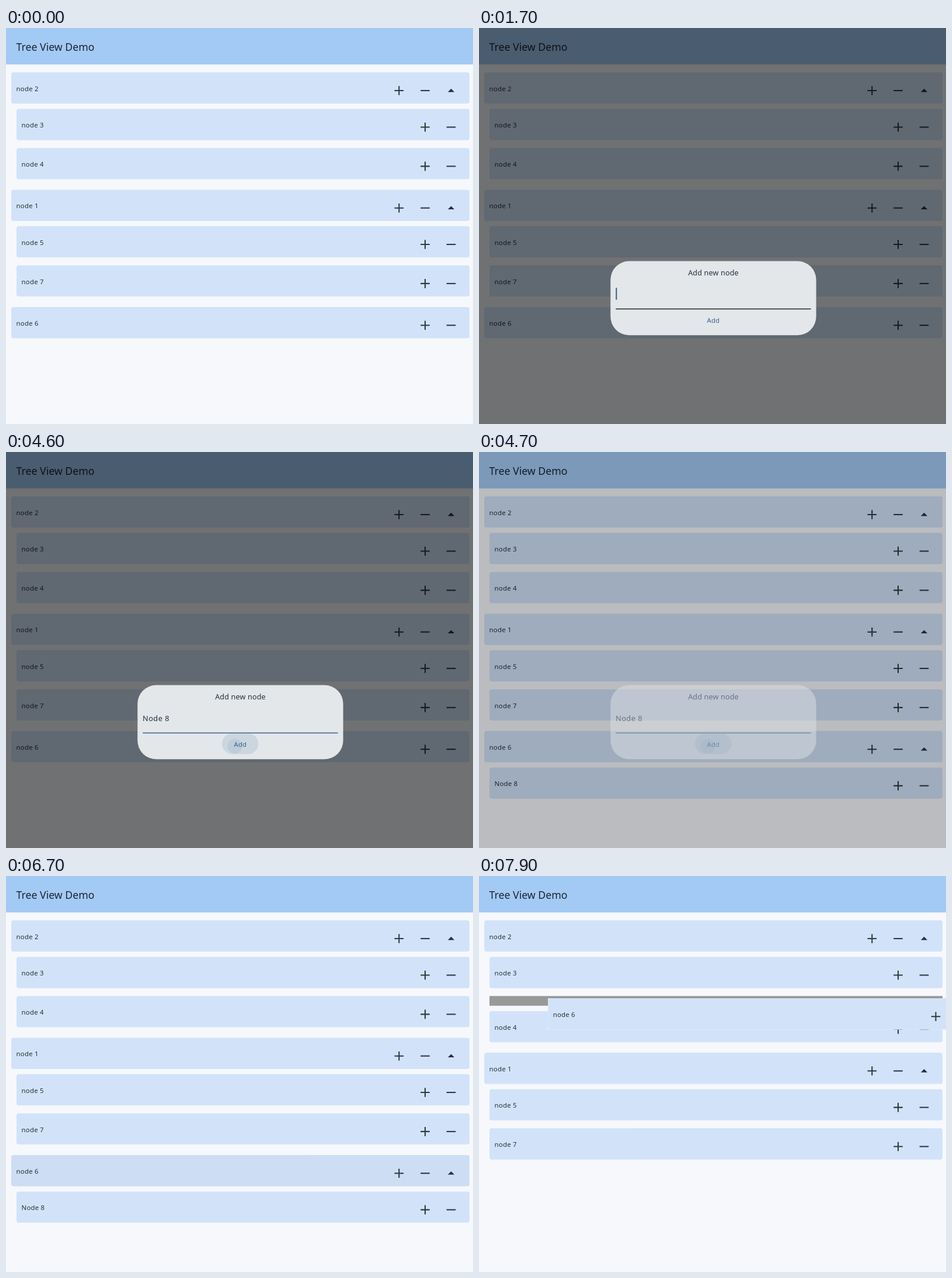
An HTML page that plays this animation: 800 by 677 pixels, repeating every 8 s.

```html
<!DOCTYPE html>
<html lang="en">
<head>
<meta charset="utf-8">
<title>Tree View Demo</title>
<style>
  html, body { margin: 0; width: 100%; height: 100%; overflow: hidden; background: #f6f8fc; }
  svg { display: block; width: 800px; height: 677px; font-family: "Noto Sans", "Open Sans", sans-serif; fill: #27313b; }
  .title { font-size: 17.7px; fill: #1b2530; }
  .label { font-size: 11.4px; letter-spacing: .2px; }
  .heading { font-size: 12.6px; letter-spacing: .15px; text-anchor: middle; }
  .input { font-size: 12.8px; letter-spacing: .45px; }
  .button { font-size: 11.3px; letter-spacing: .1px; text-anchor: middle; fill: #3c6196; }
  .card { fill: #d2e3f9; }
  .icon { fill: none; stroke: #2f3a42; stroke-width: 2.1; }

  /* One loop is 8 s, so 1.25% is a 100 ms tick. */
  .anim { animation: 8s step-end infinite; }
  .tap { animation-name: tap; }
  .modal { animation-name: modal; }
  .line { animation-name: line; }
  .caret { animation-name: caret; }
  .typed { animation-name: typed; }
  .hold { animation-name: hold; }
  .splash { animation-name: splash; transform-origin: 392px 503px; }
  .leaf { animation-name: leaf; }
  .branch { animation-name: branch; }
  .press { animation-name: press; }
  .slot { animation-name: slot; }
  .shift { animation-name: shift; }
  .drag { animation-name: drag; }

  @keyframes tap { 0%, 13.75%, 100% { opacity: 0 } 11.25% { opacity: 1 } 12.5% { opacity: .6 } }
  @keyframes modal {
    0%, 60%, 100% { opacity: 0 }
    11.25% { opacity: .13 }
    12.5% { opacity: .8 }
    13.75% { opacity: 1 }
    58.75% { opacity: .45 }
  }
  @keyframes line { 0%, 100% { fill: #20262c } 27.5% { fill: #2f455c } 28.75% { fill: #3c608c } }
  @keyframes caret {
    0% { transform: none; opacity: 1 }
    27.5% { transform: translateX(10.2px) }
    31.25% { transform: translateX(18.4px) }
    32.5% { transform: translateX(26.7px) }
    33.75% { transform: translateX(34.4px) }
    36.25% { transform: translateX(38.2px) }
    42.5% { transform: translateX(46px); opacity: 1 }
    50%, 100% { transform: translateX(46px); opacity: 0 }
  }
  @keyframes typed {
    0% { clip-path: inset(-9px 100% -9px 0) }
    27.5% { clip-path: inset(-9px 78% -9px 0) }
    31.25% { clip-path: inset(-9px 60% -9px 0) }
    32.5% { clip-path: inset(-9px 42% -9px 0) }
    33.75% { clip-path: inset(-9px 25% -9px 0) }
    42.5%, 100% { clip-path: inset(-9px -9px -9px 0) }
  }
  @keyframes hold { 0%, 60%, 100% { opacity: 0 } 55% { opacity: .5 } 56.25% { opacity: 1 } }
  @keyframes splash { 0%, 100% { transform: scale(0) } 55% { transform: scale(.3) } 56.25% { transform: scale(.65) } 57.5% { transform: none } }
  @keyframes leaf { 0% { opacity: 1 } 58.75%, 100% { opacity: 0 } }
  @keyframes branch { 0%, 88.75%, 100% { opacity: 0 } 58.75% { opacity: 1 } }
  @keyframes press { 0%, 88.75%, 100% { opacity: 0 } 83.75% { opacity: .02 } 85% { opacity: .035 } }
  @keyframes slot { 0% { opacity: 0 } 98.75%, 100% { opacity: 1 } }
  @keyframes shift { 0% { transform: none } 98.75%, 100% { transform: translateY(25.6px) } }
  @keyframes drag {
    0% { opacity: 0; transform: none }
    88.75% { opacity: 1; transform: translate(6px, -8px); animation-timing-function: steps(2) }
    91.25% { opacity: 1; transform: translate(58.6px, -111.2px); animation-timing-function: steps(6) }
    98.75%, 100% { opacity: 1; transform: translate(109.2px, -268px) }
  }
</style>
</head>
<body>
<svg id="stage" viewBox="0 0 800 677"></svg>
<script>
  const plus = (x, y) => `<path class="icon" d="M${x - 7.8} ${y}h15.6M${x} ${y - 7.8}v15.6"/>`;
  const minus = (x, y) => `<path class="icon" d="M${x - 7.8} ${y}h15.6"/>`;
  const arrow = (x, y) => `<path d="M${x - 5.6} ${y + 2.4}h11.2l-5.6 -5.6z"/>`;
  const box = (cls, x, y, w, h, r = 0, attrs = '') =>
    `<rect class="${cls}" x="${x}" y="${y}" width="${w}" height="${h}" rx="${r}" ${attrs}/>`;
  const text = (cls, x, y, s) => `<text class="${cls}" x="${x}" y="${y}">${s}</text>`;
  const group = (cls, ...parts) => `<g class="anim ${cls}">${parts.join('')}</g>`;

  function row(name, top, depth, open = false) {
    const x = 9 + 9 * depth, y = top + 31.2;
    const [px, mx] = open ? [673.3, 718] : [718, 762.5];
    return box('card', x, top, 794 - x, 53.4, 4) +
      text('label', x + 8.6, top + 31.8, name) +
      plus(px, y) + minus(mx, y) + (open ? arrow(762.5, y) : '');
  }

  const dialog = [
    box('', 225.3, 398.5, 352.3, 126.8, 32, 'fill="#e3e7ea"'),
    text('heading', 401.5, 423, 'Add new node'),
    text('anim typed input', 234, 459.5, 'Node 8'),
    box('anim caret', 234.3, 444, 2, 20.5, 0, 'fill="#33608f"'),
    box('anim line', 234.2, 479.6, 334.4, 1.5),
    group('hold',
      box('', 370, 481, 62.3, 35.5, 17.7, 'fill="#cbd6df"'),
      '<circle class="anim splash" cx="392" cy="503" r="12.5" fill="#bccdd9"/>'),
    text('button', 401.3, 503.7, 'Add')
  ];

  document.getElementById('stage').innerHTML = [
    box('', 0, 0, 800, 677, 0, 'fill="#f6f8fc"'),
    box('', 0, 0, 800, 62.3, 0, 'fill="#a3caf5"'),
    text('title', 17.6, 38.5, 'Tree View Demo'),
    row('node 2', 75.8, 0, true),
    row('node 3', 138.3, 1),
    box('anim slot', 18, 205.2, 776, 16.6, 0, 'fill="#999"'),
    group('shift',
      row('node 4', 205.2, 1),
      row('node 1', 276.5, 0, true),
      row('node 5', 338.8, 1),
      row('node 7', 405.7, 1)),
    group('leaf', row('node 6', 477, 0)),
    group('branch', row('node 6', 477, 0, true), row('Node 8', 539.4, 1)),
    box('anim press', 9, 477, 785, 53.4, 4, 'fill="#000"'),
    box('anim tap', 695.8, 486, 44.6, 35.6, 17.8, 'fill="#000" fill-opacity=".065"'),
    box('anim modal', 0, 0, 800, 677, 0, 'fill="#000" fill-opacity=".54"'),
    group('modal', ...dialog),
    group('drag', box('', 9, 477, 785, 53.4, 0, 'fill="#fafbfe"'), row('node 6', 477, 0, true))
  ].join('');
</script>
</body>
</html>
```
